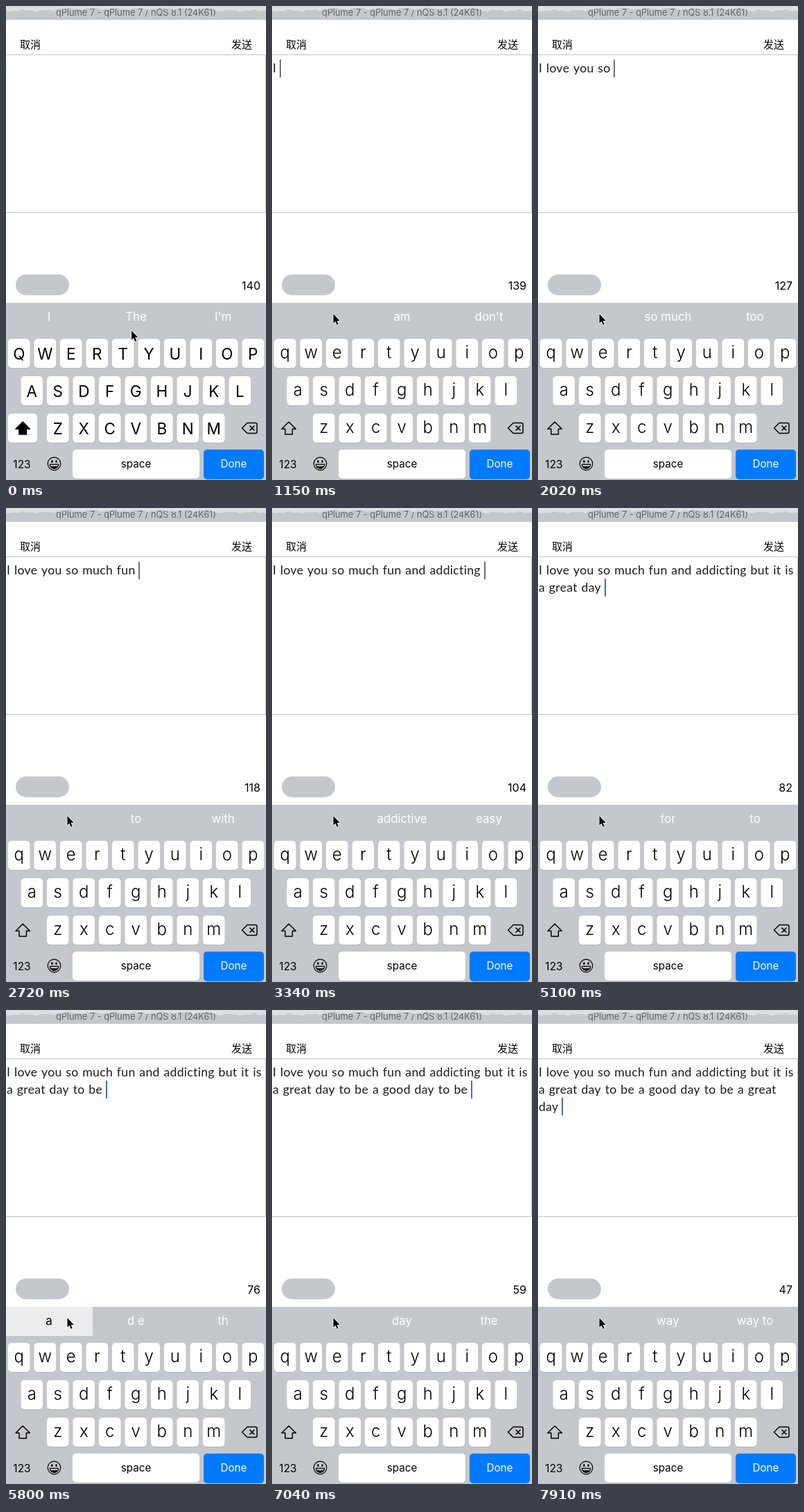
An HTML page with a canvas for the animation above (7990 ms loop, 375 px wide and 685 px high).

```html
<!DOCTYPE html>
<html lang="en">
<head>
<meta charset="utf-8">
<title>Predictive typing</title>
<style>
  html, body { margin: 0; width: 100%; height: 100%; overflow: hidden; background: #fff; }
  canvas { display: block; width: 375px; height: 685px; }
</style>
</head>
<body>
<canvas id="stage"></canvas>
<script>
const W = 375, H = 685, LOOP = 7990, TICK = 87.8;
const GREY = '#c4c7cc', BLUE = '#007aff';
const UI = 'Inter, "Open Sans", sans-serif';
const HAN = '"Noto Sans CJK SC", "Noto Sans CJK", sans-serif';

const words = ('I love you so much fun and addicting but it is a great day ' +
  'to be a good day to be a great day').split(' ');
const lineStarts = [0, 11, 23];

// Middle and right predictions after each accepted word
const hints = ("The|I'm,am|don't,the|it,guys|all,so much|too,for|more,to|with,I|the," +
  'addictive|easy,and|to,is|was,not|so,not|the,good|new,for|to,at|and,day|the,' +
  'good|new,time|one,to|for,the|get,day|the,good|new,time|way,way|way to')
  .split(',').map(pair => pair.split('|'));
const fadingHints = { 16: ['d e', 'th'] };

const canvas = document.getElementById('stage');
const ctx = canvas.getContext('2d');
const ratio = window.devicePixelRatio || 1;
canvas.width = W * ratio;
canvas.height = H * ratio;
ctx.scale(ratio, ratio);

// Tick at which word k (from 0) is inserted
const insertTick = k => Math.floor(13.6 + 3.35 * k);

function label(str, x, y, size, color = '#000', align = 'center', weight = 400, family = UI) {
  ctx.font = `${weight} ${size}px ${family}`;
  ctx.textAlign = align;
  ctx.fillStyle = color;
  ctx.fillText(str, x, y);
}

function box(x, y, w, h, r, color) {
  ctx.fillStyle = color;
  ctx.beginPath();
  ctx.roundRect(x, y, w, h, r);
  ctx.fill();
}

function poly(points) {
  ctx.beginPath();
  points.forEach(([x, y]) => ctx.lineTo(x, y));
  ctx.closePath();
}

function key(x, y, w, color = '#fff') {
  box(x, y + 1, w, 42, 5, '#b2b5ba');
  box(x, y, w, 42, 5, color);
}

function drawHeader() {
  ctx.fillStyle = GREY;
  ctx.fillRect(0, 0, W, 20);
  label('qPlume 7 - qPlume 7 / nQS 8.1 (24K61)', 187.5, 13.5, 12.9, '#45474a', 'center', 300);

  // Ragged pale edge along the top
  ctx.fillStyle = '#dddfe2';
  ctx.beginPath();
  ctx.moveTo(0, 0);
  for (let x = 0; x <= W; x += 3) {
    const depth = x < 70 || x > 302 ? 6.5 : 4;
    ctx.lineTo(x, depth + Math.sin(x * 0.19) + 0.8 * Math.sin(x * 0.47));
  }
  ctx.lineTo(W, 0);
  ctx.fill();

  label('取消', 20, 61, 15, '#000', 'left', 400, HAN);
  label('发送', 325, 61, 15, '#000', 'left', 400, HAN);
  ctx.fillStyle = '#c3c3c3';
  ctx.fillRect(0, 70, W, 1);
  ctx.fillRect(0, 298, W, 1);
  ctx.fillRect(374, 70, 1, 229);
}

function caretAlpha(n) {
  if (n >= insertTick(0)) return 1;
  if (n < 2) return 0.12 - 0.06 * n;
  if (n < 4) return 0;
  if (n < 10) return Math.min(1, (n - 3) / 4);
  return 1 - (n - 9) / 4;
}

function drawText(n, count) {
  ctx.letterSpacing = '0.3px';
  ctx.wordSpacing = '1px';
  let caretX = 0, row = 0;
  lineStarts.forEach((start, i) => {
    if (count <= start) return;
    const end = Math.min(count, lineStarts[i + 1] || words.length);
    const str = words.slice(start, end).join(' ') + ' ';
    label(str, 1, 96 + 25 * i, 17.6, '#1a1a1a', 'left', 400, 'Lato, sans-serif');
    caretX = 1 + ctx.measureText(str).width;
    row = i;
  });
  ctx.letterSpacing = ctx.wordSpacing = '0px';

  ctx.globalAlpha = caretAlpha(n);
  ctx.fillStyle = count > 0 && n < 50 ? '#6d6f7c' : '#4468dd';
  ctx.fillRect(Math.min(369, Math.round(caretX - 1)), 77.5 + 24.7 * row, 2, 25.5);
  ctx.globalAlpha = 1;

  const used = words.slice(0, count).join(' ').length;
  box(14, 388, 77, 30, 15, GREY);
  label(String(140 - used), 367, 410, 16, '#000', 'right');
}

function drawHints(count, pressed) {
  ctx.fillStyle = GREY;
  ctx.fillRect(0, 429, W, H - 429);
  if (pressed) {
    ctx.fillStyle = '#ebecee';
    ctx.fillRect(0, 429, 125, 42);
    label(words[count], 62, 455, 17);
  } else if (count === 0) {
    label(words[0], 62, 455, 17, '#fff');
  }
  const pair = pressed && fadingHints[count] || hints[count];
  label(pair[0], 187.5, 455, 16.8, '#fff');
  label(pair[1], 313, 455, 16.8, '#fff');
}

function drawShift(upper) {
  if (upper) key(3, 589, 42);
  poly([[24.2, 601], [34.4, 611.3], [29.4, 611.3], [29.4, 619],
    [19, 619], [19, 611.3], [14, 611.3]]);
  ctx.fillStyle = ctx.strokeStyle = '#000';
  ctx.lineWidth = 1.5;
  ctx.lineJoin = 'round';
  ctx.stroke();
  if (upper) ctx.fill();
}

function drawDelete() {
  ctx.strokeStyle = '#000';
  ctx.lineWidth = 1.5;
  ctx.beginPath();
  ctx.moveTo(340.5, 610);
  ctx.lineTo(348, 602.5);
  ctx.arcTo(362, 602.5, 362, 610, 2.5);
  ctx.arcTo(362, 617.5, 348, 617.5, 2.5);
  ctx.lineTo(348, 617.5);
  ctx.closePath();
  ctx.moveTo(351.5, 606.5);
  ctx.lineTo(358.5, 613.5);
  ctx.moveTo(358.5, 606.5);
  ctx.lineTo(351.5, 613.5);
  ctx.stroke();
}

function drawSmiley() {
  const x = 69.5, y = 661.5;
  ctx.fillStyle = ctx.strokeStyle = '#000';
  ctx.lineWidth = 1.2;
  ctx.beginPath();
  ctx.arc(x, y, 9.3, 0, 2 * Math.PI);
  ctx.stroke();
  ctx.beginPath();
  ctx.ellipse(x - 3.1, y - 3.3, 1.3, 1.9, 0, 0, 2 * Math.PI);
  ctx.ellipse(x + 3.1, y - 3.3, 1.3, 1.9, 0, 0, 2 * Math.PI);
  ctx.fill();
  ctx.beginPath();
  ctx.arc(x, y + 0.8, 6.2, 0, Math.PI);
  ctx.closePath();
  ctx.stroke();
  ctx.beginPath();
  ctx.arc(x, y + 0.8, 6.2, 0.5, Math.PI - 0.5);
  ctx.fill();
}

function drawKeys(upper) {
  ['qwertyuiop', 'asdfghjkl', 'zxcvbnm'].forEach((row, r) => {
    const y = 481 + 54 * r;
    const left = [3, 21.5, 59][r];
    [...row].forEach((ch, i) => {
      const x = left + 37.5 * i;
      key(x, y, 31.5);
      if (upper) label(ch.toUpperCase(), x + 15.75, y + 29.5, 22.5);
      else label(ch, x + 15.75, y + 28, 24, '#000', 'center', 300);
    });
  });
  drawShift(upper);
  drawDelete();
  label('123', 23, 668, 15.5);
  drawSmiley();
  key(96, 641, 183);
  label('space', 187.5, 667, 15.2);
  box(285, 641, 87, 43, 5, BLUE);
  label('Done', 328.5, 667, 15.2, '#fff');
}

function pointerAt(n) {
  const ease = p => p * p * (3 - 2 * p);
  const clamp = v => Math.max(0, Math.min(1, v));
  return [181 - 92.5 * ease(clamp((n - 3) / 4)), 469 - 24 * ease(clamp(n / 2))];
}

function drawPointer(n) {
  const [x, y] = pointerAt(n);
  ctx.save();
  ctx.translate(x, y);
  poly([[0, 0], [0, 13.4], [3, 10.7], [5.2, 15.8], [7.3, 14.9], [5.2, 9.9], [9.4, 9.9]]);
  ctx.strokeStyle = '#fff';
  ctx.lineWidth = 1.6;
  ctx.stroke();
  ctx.fillStyle = '#000';
  ctx.fill();
  ctx.restore();
}

function draw(ms) {
  const n = Math.floor((ms % LOOP) / TICK);
  let count = 0;
  while (count < words.length && insertTick(count) <= n) count++;
  const pressed = count < words.length && n === insertTick(count) - 1;

  ctx.fillStyle = '#fff';
  ctx.fillRect(0, 0, W, H);
  drawHeader();
  drawText(n, count);
  drawHints(count, pressed);
  drawKeys(count === 0);
  drawPointer(n);
}

const begin = performance.now();
function loop() {
  draw(performance.now() - begin);
  requestAnimationFrame(loop);
}
loop();
</script>
</body>
</html>
```
